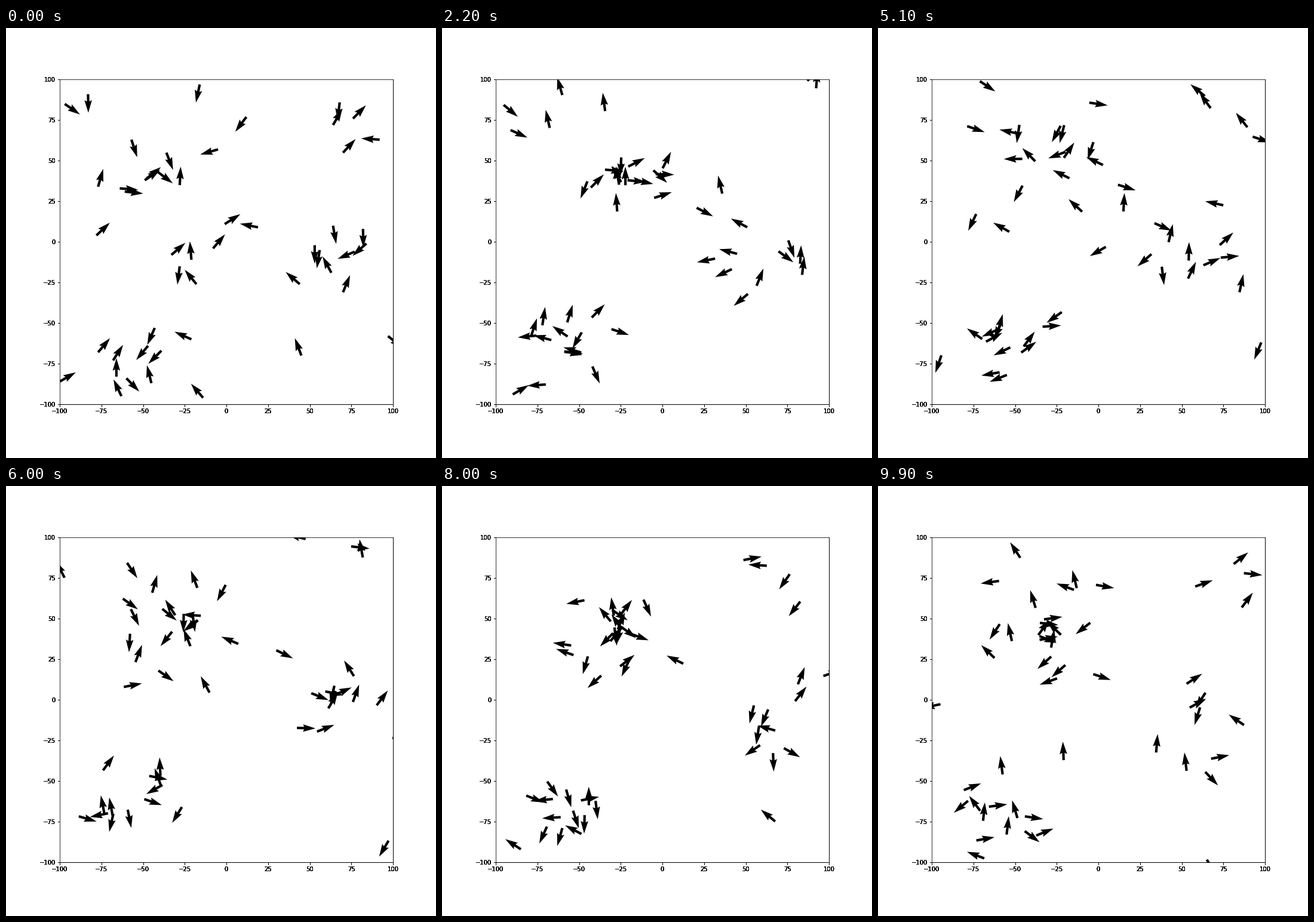
Write a matplotlib script that moves like this. It is 720 px wide and 720 px high and loops after 10 s.

```python
import numpy as np
import matplotlib.pyplot as plt
from matplotlib.animation import FuncAnimation

STEPS, SPEED, TURN, NOISE = 100, 2.1, 0.2, 0.12
HALF = 100
MAIN = (-27, 45)


def wrap(p):
    return (p + HALF) % (2 * HALF) - HALF


def fly(home, size, xs, ys, rng, join=STEPS):
    """Positions and headings of one flock circling its home."""
    pos = np.column_stack([xs, ys]).astype(float)
    head = None
    track = []
    for step in range(STEPS):
        to_home = wrap(np.array(home if step < join else MAIN) - pos)
        dist = np.hypot(*to_home.T)
        aim = np.arctan2(to_home[:, 1], to_home[:, 0])
        if head is None:
            head = aim + rng.normal(0, 0.8, len(aim))
        track.append((pos, head))
        pull = TURN * np.minimum(dist / size, 1.5)
        head = head + pull * np.sin(aim - head) + rng.normal(0, NOISE, len(head))
        pos = wrap(pos + SPEED * np.column_stack([np.cos(head), np.sin(head)]))
    return track


rng = np.random.default_rng(7)
tracks = [
    fly(MAIN, 21,
        [-16, 12, -5, -57, -36, -41, -28, -77, -64, -61, -48, -49, -78, -33, -21, -18, -8],
        [97, 77, 57, 63, 55, 43, 35, 34, 33, 31, 39, 38, 4, -8, -11, -26, -4], rng),
    fly((-82, 87), 14, [-97, -83], [85, 91], rng, join=37),
    fly((17, 17), 12, [-1, 19], [11, 9], rng, join=54),
    fly((81, 80), 13, [68, 64, 76, 70, 92], [86, 72, 76, 55, 63], rng),
    fly((63, -9), 18,
        [64, 82, 53, 56, 77, 84, 44, 63, 70, 45],
        [10, 8, -2, -5, -6, -1, -26, -19, -31, -70], rng),
    fly((-56, -65), 18,
        [-28, 97, -43, -21, -47, -39, -77, -68, -66, -60, -63, -45, -100, -14],
        [-15, -58, -53, -60, -64, -67, -68, -73, -83, -84, -95, -87, -86, -96], rng),
]
states = [(np.concatenate([p for p, _ in now]), np.concatenate([h for _, h in now]))
          for now in zip(*tracks)]

plt.rcParams.update({"font.family": "DejaVu Sans", "font.size": 10})
fig = plt.figure(figsize=(10, 10), dpi=72, facecolor="white")
fig.subplots_adjust(left=0.125, right=0.9, bottom=0.125, top=0.88)

# Stacked axes give the heavy tick labels
ticks = np.arange(-HALF, HALF + 1, 25)
for _ in range(5):
    ax = fig.add_subplot()
    ax.set(xlim=(-HALF, HALF), ylim=(-HALF, HALF), xticks=ticks, yticks=ticks)

pos, head = states[0]
arrows = ax.quiver(*pos.T, np.cos(head), np.sin(head), color="black")
ax.set(xlim=(-HALF, HALF), ylim=(-HALF, HALF))


def update(i):
    pos, head = states[i]
    arrows.set_offsets(pos)
    arrows.set_UVC(np.cos(head), np.sin(head))
    return (arrows,)


anim = FuncAnimation(fig, update, frames=STEPS, interval=100, repeat=True,
                     repeat_delay=0, blit=False)
plt.show()
```
